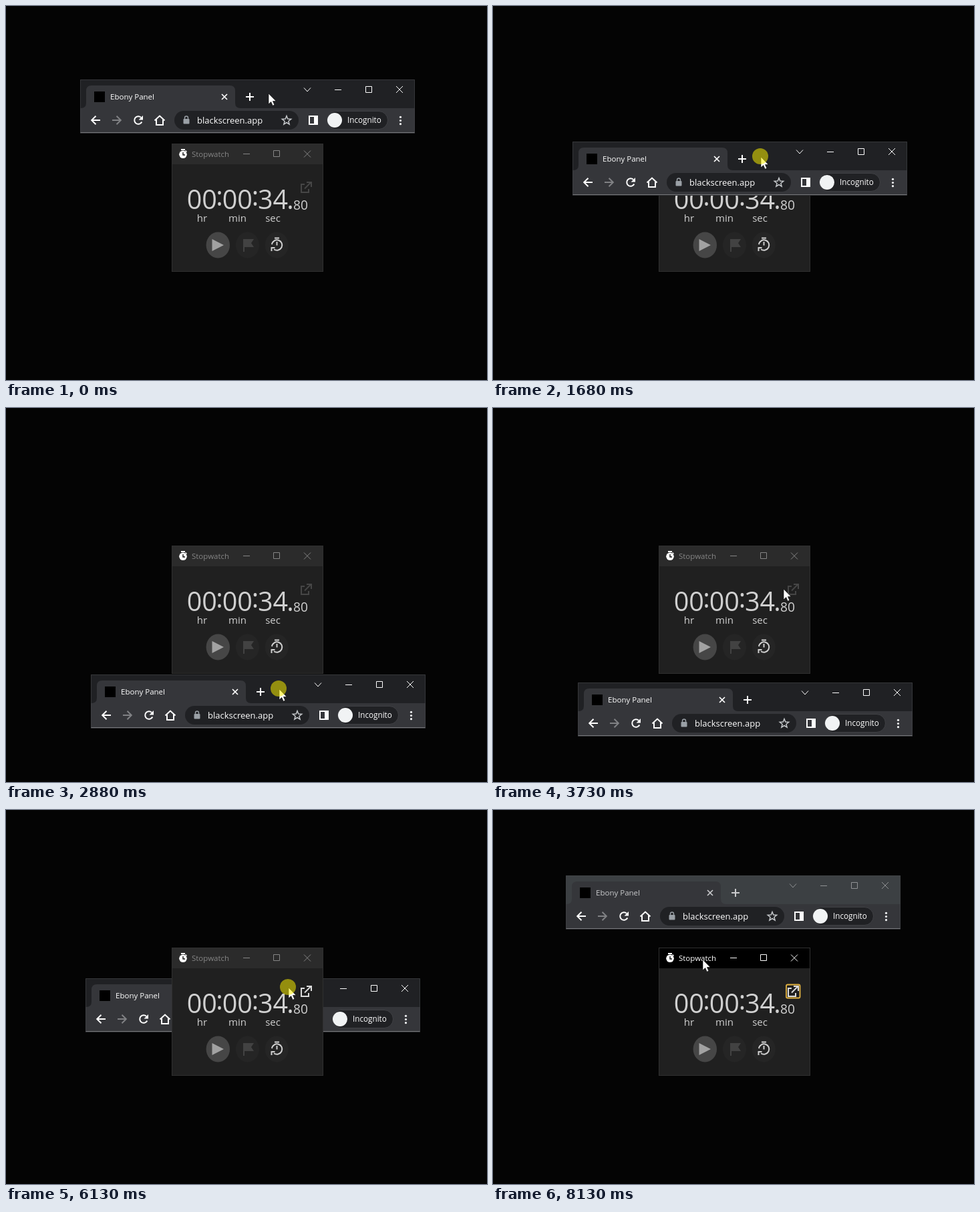
Recreate the animation shown at these times as an HTML page. Size 720 px wide and 560 px high, loop 8330 ms.

```html
<!DOCTYPE html>
<html lang="en">
<head>
<meta charset="utf-8">
<title>Always on top</title>
<style>
  html, body { margin: 0; width: 100%; height: 100%; overflow: hidden; background: #040404; }
  svg { display: block; width: 720px; height: 560px; font-family: "Open Sans", "Noto Sans", sans-serif; }
  .line { fill: none; stroke: #fff; stroke-width: 2; }
  .thin { fill: none; stroke: var(--control); stroke-width: 1; }
  #browser { --bar: #202124; --control: #fff; --label: #fff; }
  #browser.idle { --bar: #3c4043; --control: #909294; --label: #c9cacc; }
  #watch { --bar: #000; --control: #fff; }
  #watch.idle { --bar: #2b2b2b; --control: #858585; }
  #pin { fill: none; stroke: #464646; stroke-width: 2; }
  #watch.pinned #pin { stroke: #dcdcdc; }
  .big { font-size: 39.5px; text-anchor: middle; }
  .unit { font-size: 15px; text-anchor: middle; }
</style>
</head>
<body>
<svg viewBox="0 0 720 560">
  <g id="watch">
    <rect x="248.5" y="206.5" width="226" height="191" fill="#202020" stroke="#303030"/>
    <rect x="249" y="207" width="225" height="30" fill="var(--bar)"/>
    <g fill="#fff">
      <circle cx="265" cy="222.3" r="5.8"/>
      <path d="M262 214h6v2h-6zM269 216l2 2-1 1-2-2z"/>
    </g>
    <path d="M265 219v4h3" fill="none" stroke="#111" stroke-width="1.4"/>
    <text x="278" y="226" font-size="11.5" fill="var(--control)">Stopwatch</text>
    <path class="thin" d="M355 221.5h10M400.5 216.5h9v9h-9zM446 216.5l10 10m0-10l-10 10"/>

    <g fill="#d0d0d0">
      <g class="big">
        <text x="293.3" y="304">00</text><text x="319.5" y="299">:</text>
        <text x="346.3" y="304">00</text><text x="373" y="299">:</text>
        <text x="399.5" y="304">34</text><text x="425.5" y="304">.</text>
      </g>
      <text x="430" y="305" font-size="19.2">80</text>
      <g class="unit">
        <text x="293.5" y="323">hr</text><text x="346.5" y="323">min</text><text x="399.5" y="323">sec</text>
      </g>
    </g>

    <path id="pin" d="M447 267h-5v12h11v-5M447 273.500l9.500-9.500M450 264h7v7"/>
    <rect id="focus" x="439" y="261.5" width="20.500" height="20" rx="2" fill="none" stroke="#e3b341" stroke-width="1.800"/>

    <ellipse cx="317.300" cy="358" rx="17.700" ry="19.500" fill="#464646"/>
    <path d="M308.500 349v18l17.500-9z" fill="#a2a2a2"/>
    <ellipse cx="361.500" cy="358" rx="17.500" ry="19.500" fill="#252525"/>
    <path d="M355 349h16l-4 6 4 6h-14v7h-2z" fill="#424242"/>
    <ellipse cx="405.300" cy="358" rx="17.500" ry="19.500" fill="#252525"/>
    <g fill="none" stroke="#d0d0d0" stroke-width="2">
      <path d="M398 357a7.700 7.700 0 1 1 3 7.200M402 347.500h7M405.500 353v5.500"/>
      <path d="M397.500 367v-5h5"/>
    </g>
  </g>

  <g id="browser">
    <rect x="111" y="110" width="501" height="81" fill="var(--bar)"/>
    <path d="M112 153q8 0 8-8v-18q0-8 8-8h207q8 0 8 8v18q0 8 8 8z" fill="#35363a"/>
    <rect x="111" y="153" width="501" height="36" fill="#35363a"/>
    <rect x="111" y="189" width="501" height="1" fill="#77787b"/>
    <rect x="111" y="190" width="501" height="1" fill="#27282b"/>
    <path d="M111.500 190v-79.500h500v79.500" fill="none" stroke="#45464a" opacity=".6"/>

    <rect x="132" y="128" width="16" height="16"/>
    <text x="156" y="140" font-size="11.500" fill="var(--label)">Ebony Panel</text>
    <path class="line" style="stroke:var(--label);stroke-width:1.700" d="M323 132l8 8m0-8l-8 8"/>
    <path class="line" style="stroke:var(--label)" d="M359 136h12M365 130v12"/>
    <path class="thin" d="M446 122.500l5 5.500 5-5.500M492 125.500h10M538.500 120.500h9v9h-9zM584 120l10 10m0-10l-10 10"/>

    <path class="line" d="M141 171h-12.500m6-6.300l-6.300 6.300 6.300 6.300"/>
    <path class="line" style="stroke:#808184" d="M159 171h12.500m-6-6.300l6.300 6.300-6.300 6.300"/>
    <path class="line" d="M203.300 173.500a5.800 5.800 0 1 1-1.200-6.600"/>
    <path d="M205 164v6.500h-6.500z" fill="#fff"/>
    <path class="line" d="M222.500 171.500l7.500-7 7.500 7M225 170v8h10v-8"/>

    <rect x="252" y="157" width="186" height="28" rx="14" fill="#202124"/>
    <rect x="265.500" y="169" width="9" height="7.500" rx="1" fill="#9aa0a6"/>
    <path d="M267.500 169v-1.500a2.500 2.500 0 0 1 5 0v1.500" fill="none" stroke="#9aa0a6" stroke-width="1.400"/>
    <text x="286" y="176" font-size="13" fill="#fff">blackscreen.app</text>
    <path id="star" fill="none" stroke="#c4c7ca" stroke-width="1.500"/>

    <rect class="line" x="454" y="165" width="12" height="12"/>
    <rect x="461" y="164" width="6" height="14" fill="#fff"/>
    <rect x="480.500" y="157.500" width="91" height="27" rx="13.500" fill="#202124" stroke="#404145"/>
    <circle cx="492" cy="171" r="11" fill="#f1f3f4"/>
    <text x="511" y="175" font-size="11.700" fill="#fff">Incognito</text>
    <g fill="#f1f3f4">
      <circle cx="590.500" cy="166.300" r="1.600"/><circle cx="590.500" cy="171.500" r="1.600"/><circle cx="590.500" cy="176.700" r="1.600"/>
    </g>
  </g>

  <g id="cursor">
    <path d="M1 1v16l3.700-3.500 2.500 5.700 2.700-1.100-2.500-5.600h4.800z" fill="#fff" stroke="#000" stroke-width=".6"/>
    <circle id="press" r="12" fill="#f8ec00" opacity=".54"/>
  </g>
</svg>
<script>
const LOOP = 8330, STEP = 70;
const [watch, browser, cursor, press, focusRing, star] =
  ["watch", "browser", "cursor", "press", "focus", "star"].map(id => document.getElementById(id));

// Each key is [time, x, y]
const browserPath = [
  [1120, 111, 110], [1680, 119, 203], [1960, 127, 274], [2390, 127, 329], [2810, 127, 395],
  [3090, 127, 411], [5220, 127, 411], [6060, 119, 275], [6130, 119, 252], [6950, 109, 145], [7300, 109, 98]
];
const cursorPath = [
  [1120, 392, 130], [1680, 400, 225], [1960, 408, 296], [2390, 408, 352], [2810, 408, 416],
  [3090, 408, 432], [3170, 408, 432], [3730, 434, 270], [3940, 446, 270], [4070, 446, 270],
  [4550, 427, 390], [4760, 430, 431], [5220, 430, 431], [6060, 422, 290], [6130, 422, 265],
  [6950, 412, 162], [7300, 412, 118], [7370, 412, 118], [7790, 318, 231], [7860, 313, 223]
];
const presses = [[400, 3240], [3940, 4140], [5020, 7370], [7930, 8130]];
const PINNED = 3940, BROWSER_CLICK = 5020, WATCH_CLICK = 7930;

function along(path, t) {
  const next = path.findIndex(key => key[0] > t);
  if (next < 1) return path.at(next).slice(1);
  const [t0, x0, y0] = path[next - 1], [t1, x1, y1] = path[next];
  const p = Math.floor((t - t0) / STEP) * STEP / (t1 - t0);
  return [Math.round(x0 + (x1 - x0) * p), Math.round(y0 + (y1 - y0) * p)];
}

const show = (el, on) => el.setAttribute("visibility", on ? "visible" : "hidden");
const move = (el, x, y) => el.setAttribute("transform", `translate(${x} ${y})`);

star.setAttribute("d", "M" + Array.from({ length: 10 }, (_, i) => {
  const r = i % 2 ? 3 : 7, a = (i / 5 - 0.5) * Math.PI;
  return [420 + r * Math.cos(a), 171.5 + r * Math.sin(a)];
}).join("L") + "z");

function draw() {
  const t = performance.now() % LOOP;
  const pinned = t >= PINNED;
  const watchActive = (pinned && t < BROWSER_CLICK) || t >= WATCH_CLICK;
  const [bx, by] = along(browserPath, t);

  move(browser, bx - 111, by - 110);
  move(cursor, ...along(cursorPath, t));
  browser.classList.toggle("idle", watchActive);
  watch.classList.toggle("idle", !watchActive);
  watch.classList.toggle("pinned", pinned);
  show(focusRing, t >= WATCH_CLICK);
  show(press, presses.some(([from, to]) => t >= from && t < to));

  const front = pinned ? watch : browser;
  if (cursor.previousElementSibling !== front) cursor.before(front);
  requestAnimationFrame(draw);
}
draw();
</script>
</body>
</html>
```
